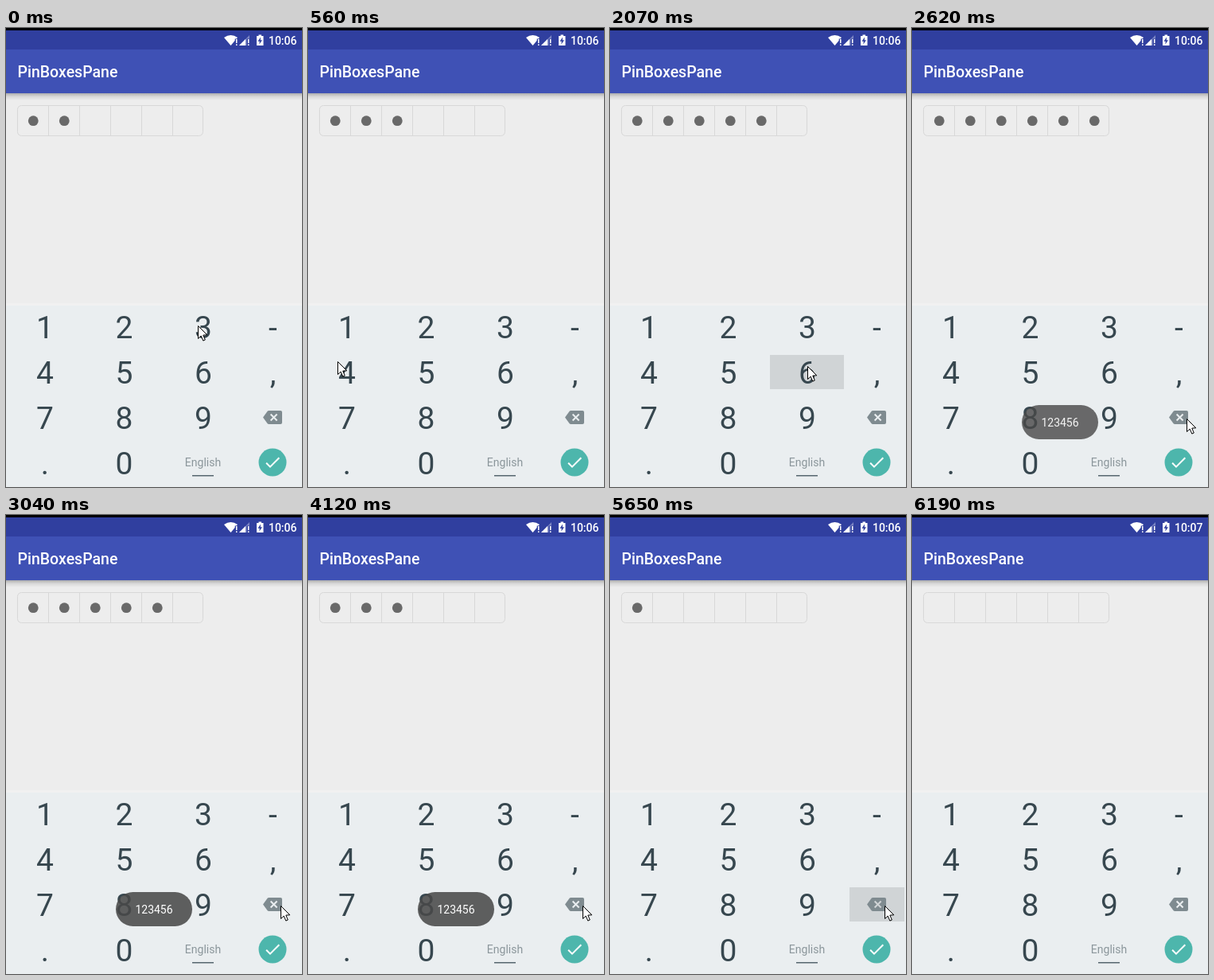
Animation of 372 by 577 pixels, one loop 6.89 s. Source, as an HTML page with a canvas:

```html
<!DOCTYPE html>
<html lang="en">
<head>
<meta charset="utf-8">
<title>Pin entry</title>
<style>
  html, body { margin: 0; width: 100%; height: 100%; overflow: hidden; background: #ededed; }
  canvas { display: block; }
</style>
</head>
<body>
<canvas id="stage" width="372" height="577"></canvas>
<script>
const ctx = document.getElementById('stage').getContext('2d');
const LOOP = 6890, BEATS = 50, LEAD = 33;
const PAPER = '#ededed', KEYPAD = '#eaeef0', PRESSED = '#d0d4d6', BAR = '#303f9f';

// Beats at which a tap lands: digits 3 to 6 first, then only deletes.
const TAPS = [2, 8, 11, 16, 22, 27, 30, 34, 37, 42];
const DIGITS = 4, FIRST_DIGIT = 3, FILLED = 2;

// Pointer stops; it leaves each on the given beat and glides for two beats.
const STOPS = [
  { x: 241, y: 374, leave: 2 },
  { x: 37, y: 419, leave: 7 },
  { x: 160, y: 422, leave: 11 },
  { x: 248, y: 425, leave: 16 },
  { x: 345, y: 491, leave: 42 },
  { x: 336, y: 557 }
];

const colX = col => col < 3 ? 49 + 99.5 * col : 335.5;
const rowY = row => 375.5 + 57 * row;
const clamp = v => Math.min(1, Math.max(0, v));
const smooth = p => p * p * (3 - 2 * p);

function dotCount(beat) {
  const done = TAPS.filter(tap => tap <= beat).length;
  return FILLED + Math.min(done, DIGITS) - Math.max(0, done - DIGITS);
}

// A key lights up for the beat before its tap lands, unless the tap is quick.
function pressedKey(beat) {
  const i = TAPS.findIndex((tap, n) => beat === tap - 1 && !(tap - TAPS[n - 1] <= 3));
  if (i < 0) return null;
  if (i >= DIGITS) return { col: 3, row: 2 };
  const n = FIRST_DIGIT + i - 1;
  return { col: n % 3, row: Math.floor(n / 3) };
}

function pointerAt(beat) {
  let { x, y } = STOPS[0];
  for (let i = 1; i < STOPS.length; i++) {
    const p = clamp((beat - STOPS[i - 1].leave) / 2) ** (2 / 3);
    x += (STOPS[i].x - x) * p;
    y += (STOPS[i].y - y) * p;
  }
  return [Math.floor(x), Math.floor(y)];
}

function toastAlpha(beat) {
  const fadeIn = Math.sin(clamp((beat - 16) / 4) * Math.PI / 2);
  return fadeIn * smooth(clamp((33.4 - beat) / 3));
}

function rect(x, y, w, h, color) {
  ctx.fillStyle = color;
  ctx.fillRect(x, y, w, h);
}

function text(str, x, y, font, color, align = 'center') {
  ctx.font = font + ' Roboto, sans-serif';
  ctx.textAlign = align;
  ctx.fillStyle = color;
  ctx.fillText(str, x, y);
}

function path(points, close) {
  ctx.beginPath();
  points.forEach(([x, y]) => ctx.lineTo(x, y));
  if (close) ctx.closePath();
}

function fillPath(points, color) {
  path(points, true);
  ctx.fillStyle = color;
  ctx.fill();
}

function strokePath(points, color, width) {
  path(points);
  ctx.strokeStyle = color;
  ctx.lineWidth = width;
  ctx.stroke();
}

function disc(x, y, r, color) {
  ctx.beginPath();
  ctx.arc(x, y, r, 0, Math.PI * 2);
  ctx.fillStyle = color;
  ctx.fill();
}

function bang(x) {
  rect(x - 1.3, 13.5, 4, 9, BAR);
  rect(x, 14, 1.5, 5, '#fff');
  rect(x, 20.3, 1.5, 1.7, '#fff');
}

function drawStatus(beat) {
  rect(0, 0, 372, 3, '#000');
  rect(0, 3, 372, 24, BAR);

  ctx.beginPath();
  ctx.moveTo(282.5, 22);
  ctx.lineTo(274, 12);
  ctx.quadraticCurveTo(282.5, 6, 291, 12);
  ctx.closePath();
  ctx.fillStyle = '#fff';
  ctx.fill();
  bang(289);

  fillPath([[293, 22], [306, 9], [306, 22]], '#7a84c2');
  fillPath([[293, 22], [301, 14], [301, 22]], '#fff');
  bang(304);

  rect(317.5, 8.5, 3.5, 2, '#fff');
  rect(315, 10, 8.5, 12, '#fff');
  fillPath([[320, 11.5], [316.5, 16.8], [318.7, 16.8], [318.4, 20.5], [322, 15.2], [319.8, 15.2]], BAR);

  text(beat < 43 ? '10:06' : '10:07', 365.5, 21, '500 14px', '#fff', 'right');
}

function drawToolbar() {
  rect(0, 27, 372, 55, '#3f51b5');
  const shade = ctx.createLinearGradient(0, 82, 0, 91);
  shade.addColorStop(0, 'rgba(0,0,0,.27)');
  shade.addColorStop(.45, 'rgba(0,0,0,.09)');
  shade.addColorStop(1, 'rgba(0,0,0,0)');
  rect(0, 82, 372, 9, shade);
  text('PinBoxesPane', 14.5, 62, '500 19.5px', '#fff', 'left');
}

function drawBoxes(count) {
  ctx.beginPath();
  ctx.roundRect(14.5, 97.5, 233, 38, 5);
  ctx.strokeStyle = '#d8d8d8';
  ctx.lineWidth = 1;
  ctx.stroke();
  for (let i = 1; i < 6; i++) {
    const x = 14.5 + 39 * i;
    strokePath([[x, 98], [x, 135]], '#d8d8d8', 1);
  }
  for (let i = 0; i < count; i++) disc(34.3 + 39 * i, 116.7, 6.4, '#696969');
}

function drawDelete(back) {
  ctx.beginPath();
  ctx.moveTo(323, 489.5);
  ctx.lineTo(328.6, 481.8);
  ctx.quadraticCurveTo(329.3, 481, 330.3, 481);
  ctx.arcTo(347, 481, 347, 498, 2);
  ctx.arcTo(347, 498, 330, 498, 2);
  ctx.lineTo(330.3, 498);
  ctx.quadraticCurveTo(329.3, 498, 328.6, 497.2);
  ctx.closePath();
  ctx.fillStyle = '#7f8b90';
  ctx.fill();
  for (const s of [-1, 1]) {
    strokePath([[332.6, 489.5 - 4 * s], [340.6, 489.5 + 4 * s]], back, 2.1);
  }
}

function drawKeypad(key) {
  rect(0, 346, 372, 3, '#f1f1f1');
  rect(0, 349, 372, 228, KEYPAD);

  if (key) {
    const w = key.col === 3 ? 69 : 93;
    rect(Math.floor(colX(key.col) - w / 2), rowY(key.row) - 21.5, w, 43, PRESSED);
  }

  ['123-', '456,', '789', '.0'].forEach((line, row) => [...line].forEach((ch, col) => {
    text(ch, colX(col), rowY(row) + 14, '400 39px', '#37474f');
  }));

  text('English', 247.5, 551, '400 14px', '#8b969b');
  rect(234, 562, 27, 1.5, '#56666f');
  drawDelete(key && key.col === 3 ? PRESSED : KEYPAD);

  disc(335, 546, 17.5, '#4db6ac');
  strokePath([[327.1, 546.7], [332, 551.6], [343.3, 540.3]], '#fff', 2);
}

function drawToast(alpha) {
  ctx.globalAlpha = alpha;
  ctx.beginPath();
  ctx.roundRect(138, 474, 96, 43, 21.5);
  ctx.fillStyle = 'rgba(73,73,73,.87)';
  ctx.fill();
  text('123456', 186, 501, '400 14px', '#fff');
  ctx.globalAlpha = 1;
}

function drawPointer(x, y) {
  ctx.save();
  ctx.translate(x + .5, y + .5);
  path([[0, 0], [0, 16], [3.7, 12.6], [6.3, 18.6], [8.8, 17.5], [6.3, 11.6], [11.3, 11.3]], true);
  ctx.fillStyle = '#fff';
  ctx.fill();
  ctx.strokeStyle = '#000';
  ctx.lineWidth = 1;
  ctx.stroke();
  ctx.restore();
}

function draw(t) {
  const beat = Math.floor((t + LEAD) * BEATS / LOOP);
  rect(0, 0, 372, 577, PAPER);
  drawStatus(beat);
  drawToolbar();
  drawBoxes(dotCount(beat));
  drawKeypad(pressedKey(beat));
  drawToast(toastAlpha(beat));
  if (beat < 45) drawPointer(...pointerAt(beat));
}

const start = performance.now();
function tick() {
  draw((performance.now() - start) % LOOP);
  requestAnimationFrame(tick);
}
tick();
</script>
</body>
</html>
```
